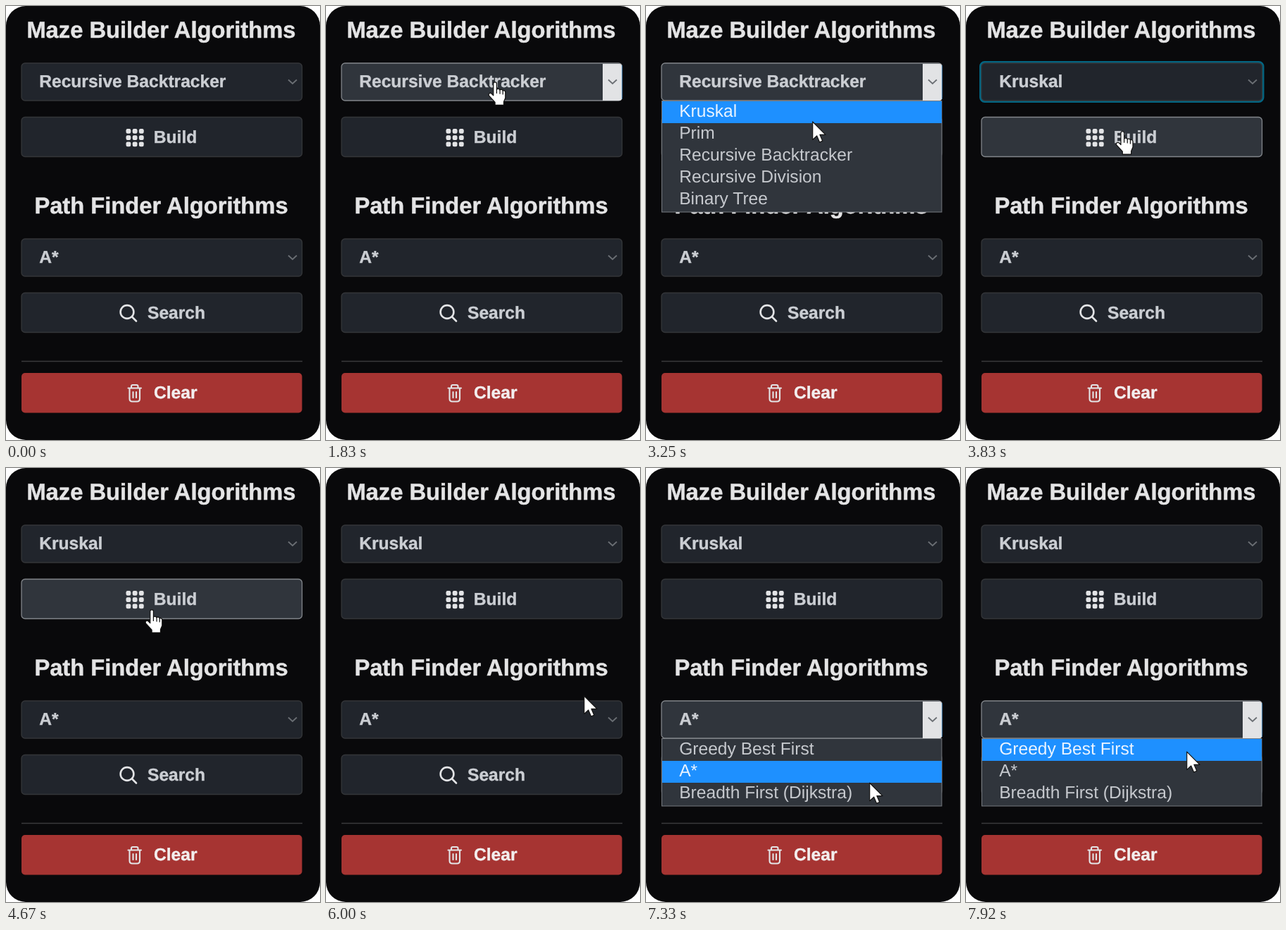
An HTML page for the animation above (8 s loop, 446 by 615 pixels).

```html
<!DOCTYPE html>
<html lang="en">
<head>
<meta charset="utf-8">
<title>Maze controls</title>
<style>
  html, body { margin: 0; width: 100%; height: 100%; overflow: hidden; background: #fff; }
  svg { display: block; text-rendering: geometricPrecision; }
  text { font: bold 24.6px "Liberation Sans", Arial, sans-serif; fill: #cbced3; stroke: #cbced3; stroke-width: .4; white-space: pre; }
  .title { font-size: 32.7px; fill: #e4e4e5; stroke: #e4e4e5; stroke-width: .5; }
  .clear { fill: #f3eeee; stroke: #f3eeee; }
  .box { fill: #21252c; stroke: #343639; stroke-width: 1.3; }
  .hover .box { fill: #30353c; stroke: #82868b; }
  .chevron { fill: none; stroke: #6b6f74; stroke-width: 1.8; }
  .arrow { display: none; }
  .hover .arrow { display: inline; }
  .ring { fill: none; stroke: #036582; stroke-width: 3; visibility: hidden; }
  .list { visibility: hidden; }
  .list text { font-weight: normal; fill: #c6c9ce; stroke: none; }
  .list .on { fill: #e9f3ff; }
  .icon { fill: none; stroke: #e3e4e6; stroke-linecap: round; stroke-linejoin: round; }
  .cursor { fill: #fff; stroke: #111; stroke-linejoin: round; visibility: hidden; }
</style>
</head>
<body>
<svg id="stage" width="446" height="615" viewBox="0 0 446 615"></svg>
<script>
const LOOP = 8000, FPS = 12, ROW = 31;

const selects = [
  { y: 81, open: 2160, close: 3495, picked: 2,
    options: ["Kruskal", "Prim", "Recursive Backtracker", "Recursive Division", "Binary Tree"] },
  { y: 330, open: 6660, close: LOOP, picked: 1,
    options: ["Greedy Best First", "A*", "Breadth First (Dijkstra)"] }
];
const buttons = [{ y: 157.5, id: "build" }, { y: 406.5, id: "search" }];

// time, x, y of the pointer's tip
const path = [
  [1160, 330, 27], [1420, 278, 70], [1830, 240, 108], [2250, 240, 108],
  [2583, 246, 200], [2833, 245, 236], [3083, 240, 185], [3250, 236, 165],
  [3417, 235, 152], [3583, 233, 152], [3750, 226, 172], [4167, 207, 201],
  [5250, 207, 201], [5830, 360, 316], [5917, 360, 316], [6000, 366, 324],
  [6333, 352, 352], [6667, 340, 358], [6833, 336, 365], [7330, 317, 447],
  [7583, 316, 466], [7667, 316, 460], [7917, 313, 403], [8000, 313, 403]
];

const label = (x, y, s, cls = "") => `<text x="${x}" y="${y}" class="${cls}">${s}</text>`;
const box = (y, h) => `<rect class="box" x="22" y="${y}" width="398.5" height="${h}" rx="5"/>`;

function selectMarkup(s, i) {
  const mid = s.y + 26;
  return `<g id="select${i}">
    <rect class="ring" x="20.5" y="${s.y - 1.5}" width="401.5" height="56" rx="6"/>
    ${box(s.y, 53)}
    <g class="arrow">
      <path d="M393 ${s.y + 1}h24q3 0 3 3v46q0 3-3 3h-24z" fill="#e2e3e5"/>
      <path d="M420.5 ${s.y + 3}v48" stroke="#4b83b0"/>
    </g>
    <path class="chevron" d="M401 ${mid - 2.5}l6 5.5l6-5.5"/>
    ${label(47.2, s.y + 34, s.options[s.picked], "value")}
  </g>`;
}

function listMarkup(s, i) {
  const top = s.y + 53.5, h = s.options.length * ROW + 2.5;
  return `<g class="list" id="list${i}">
    <rect x="22.5" y="${top}" width="397.5" height="${h}" fill="#30353c" stroke="#777b80"/>
    <rect class="mark" x="23" width="397" height="${ROW}" fill="#1e90ff"/>
    ${s.options.map((o, n) => label(47.2, s.y + 76 + n * ROW, o)).join("")}
  </g>`;
}

function gridIcon() {
  let out = "";
  for (let n = 0; n < 9; n++)
    out += `<rect x="${170.5 + n % 3 * 9.2}" y="${174 + Math.floor(n / 3) * 9.2}" width="6.8" height="6.8" rx="2.2" fill="#e3e4e6"/>`;
  return out;
}

const stage = document.getElementById("stage");
stage.innerHTML = `
  <rect width="446" height="615" rx="28" fill="#09090b"/>
  ${label(29.4, 45, "Maze Builder Algorithms", "title")}
  ${label(40.4, 294, "Path Finder Algorithms", "title")}
  <g id="build">${box(157.5, 56)}${gridIcon()}${label(209.8, 194, "Build")}</g>
  <g id="search">${box(406.5, 56)}
    <g class="icon" stroke-width="2.6"><circle cx="172" cy="433.5" r="9.4"/><path d="M179 440.500l6 6"/></g>
    ${label(201, 442.7, "Search")}</g>
  <path d="M22 503.5H421" stroke="#3a3a3c" stroke-width="1.3"/>
  <rect x="22" y="520" width="398.5" height="56.5" rx="5" fill="#a63432"/>
  <path class="icon" stroke-width="2.1" d="M173.5 541.5h18.5M178 541v-2q0-2 2-2h5.5q2 0 2 2v2M175.5 542v14.5q0 4 4 4h6.5q4 0 4-4v-14.5M180.5 547v8M185 547v8"/>
  ${label(210, 556.3, "Clear", "clear")}
  ${selects.map(selectMarkup).join("")}
  ${selects.map(listMarkup).join("")}
  <path class="cursor" id="pointer" stroke-width=".8" d="M0 0V17L4 13.3L6.6 19.3L9.4 18.1L6.8 12.2H12.2Z"/>
  <g class="cursor" id="hand" stroke-width=".8">
    <path d="M5 2a1.5 1.5 0 0 1 3 0V7.5C8 6.3 11 6.3 11 8C11 7 13.7 7 13.7 8.7C13.7 7.9 16 8 16 9.8V15L14.5 18.5V21.5H6.5V19L1 13C0 11.5 1.8 10 3.2 11L5 12.8Z"/>
    <path d="M8 7.5V11M11 8V11.5M13.7 8.7V12" fill="none"/>
  </g>`;

const $ = id => document.getElementById(id);
const show = (el, on) => { el.style.visibility = on ? "visible" : "hidden"; };

function pointerAt(t) {
  const i = path.findIndex(p => p[0] > t);
  if (i === 0) return null;
  if (i < 0) return path[path.length - 1].slice(1);
  const [t0, x0, y0] = path[i - 1], [t1, x1, y1] = path[i];
  const k = (t - t0) / (t1 - t0);
  return [x0 + (x1 - x0) * k, y0 + (y1 - y0) * k];
}

function draw(time) {
  const t = Math.floor(time * FPS / 1000 + 0.06) * 1000 / FPS;
  const at = pointerAt(t);
  const [x, y] = at || [-99, -99];
  const inside = (top, h) => x > 21 && x < 421 && y >= top && y <= top + h;
  const isOpen = s => t >= s.open && t < s.close;
  const anyOpen = selects.some(isOpen);
  let hand = false;

  selects.forEach((s, i) => {
    const open = isOpen(s), over = inside(s.y, 53), top = s.y + 54;
    const group = $("select" + i), list = $("list" + i);
    group.classList.toggle("hover", open || (over && !anyOpen));
    hand = hand || over;
    show(list, open);
    const row = y < top ? s.picked
      : Math.max(0, Math.min(s.options.length - 1, Math.floor((y - 2 - top) / ROW)));
    list.querySelector(".mark").setAttribute("y", top + row * ROW);
    list.querySelectorAll("text").forEach((el, n) => el.classList.toggle("on", n === row));
  });

  buttons.forEach(b => {
    const over = inside(b.y, 56) && !anyOpen;
    $(b.id).classList.toggle("hover", over);
    hand = hand || over;
  });

  const chosen = t >= selects[0].close;
  $("select0").querySelector(".value").textContent = selects[0].options[chosen ? 0 : 2];
  show($("select0").querySelector(".ring"), chosen && t < 4495);

  show($("pointer"), at && !hand);
  show($("hand"), at && hand);
  $("pointer").setAttribute("transform", `translate(${x + 0.7} ${y - 1}) scale(1.5)`);
  $("hand").setAttribute("transform", `translate(${x - 10} ${y - 1}) scale(1.55)`);
}

const start = performance.now();
function tick() {
  draw((performance.now() - start) % LOOP);
  requestAnimationFrame(tick);
}
tick();
</script>
</body>
</html>
```
